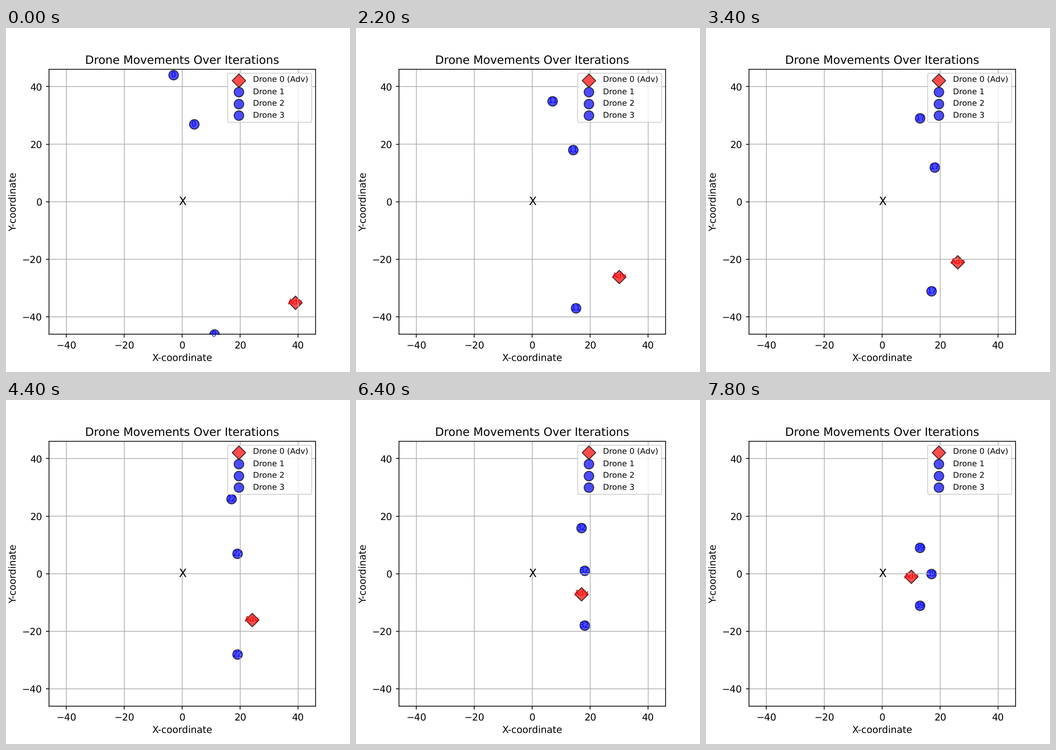
Animation, 748 px wide and 748 px high, one loop 8 s. Source, as a matplotlib script:

```python
import numpy as np
import matplotlib.pyplot as plt
from matplotlib.animation import FuncAnimation

SIZE, INCHES = 748, 5
STEPS, INTERVAL = 40, 200
LIMIT = 46

# Drones fly straight between waypoints, reached at these iterations,
# and always sit on the nearest grid cell.
ARRIVALS = [0, 5, 11, 17, 27, 39]
ROUTES = [
    [(39, -35), (35, -31), (30, -26), (26, -21), (22, -11), (10, -1)],
    [(-3, 44), (1, 41), (7, 35), (13.4, 29.4), (20.8, 21.7), (12.6, 8.6)],
    [(4, 27), (8, 24), (14, 18), (18, 12), (19.6, 2), (16.8, 0)],
    [(11, -46), (12, -41), (15, -37), (17, -31.4), (21, -23.7), (13, -10.6)],
]


def cell(route, step):
    return [np.rint(np.interp(step, ARRIVALS, axis)) for axis in zip(*route)]


# Smooth subpixel rendering of text and lines
plt.rcParams.update({"text.hinting": "none", "path.snap": False})

fig, ax = plt.subplots(figsize=(INCHES, INCHES), dpi=SIZE / INCHES)
ticks = range(-40, 41, 20)
ax.set(xlim=(-LIMIT, LIMIT), ylim=(-LIMIT, LIMIT), xticks=ticks, yticks=ticks,
       xlabel="X-coordinate", ylabel="Y-coordinate",
       title="Drone Movements Over Iterations")
ax.grid(True)
centered = dict(ha="center", va="center")
ax.text(0, 0, "X", fontsize=12, **centered)


def add_drone(n, route):
    color, shape, suffix = ("blue", "o", "") if n else ("red", "D", " (Adv)")
    x, y = cell(route, 0)
    marker = ax.scatter([x], [y], s=100, c=color, marker=shape, alpha=0.7,
                        edgecolors="black", label=f"Drone {n}{suffix}")
    tag = ax.text(x, y, "0" if n else "Adv", color=color, fontsize=8, **centered)
    return marker, tag


drones = [add_drone(n, route) for n, route in enumerate(ROUTES)]
ax.legend(loc="upper right", fontsize="small", labelspacing=0.52)


def update(step):
    for n, (marker, tag) in enumerate(drones):
        spot = cell(ROUTES[n], step)
        marker.set_offsets([spot])
        tag.set_position(spot)
        if n:
            tag.set_text(str(step))


anim = FuncAnimation(fig, update, frames=STEPS, interval=INTERVAL,
                     repeat=True, repeat_delay=0)
plt.show()
```
